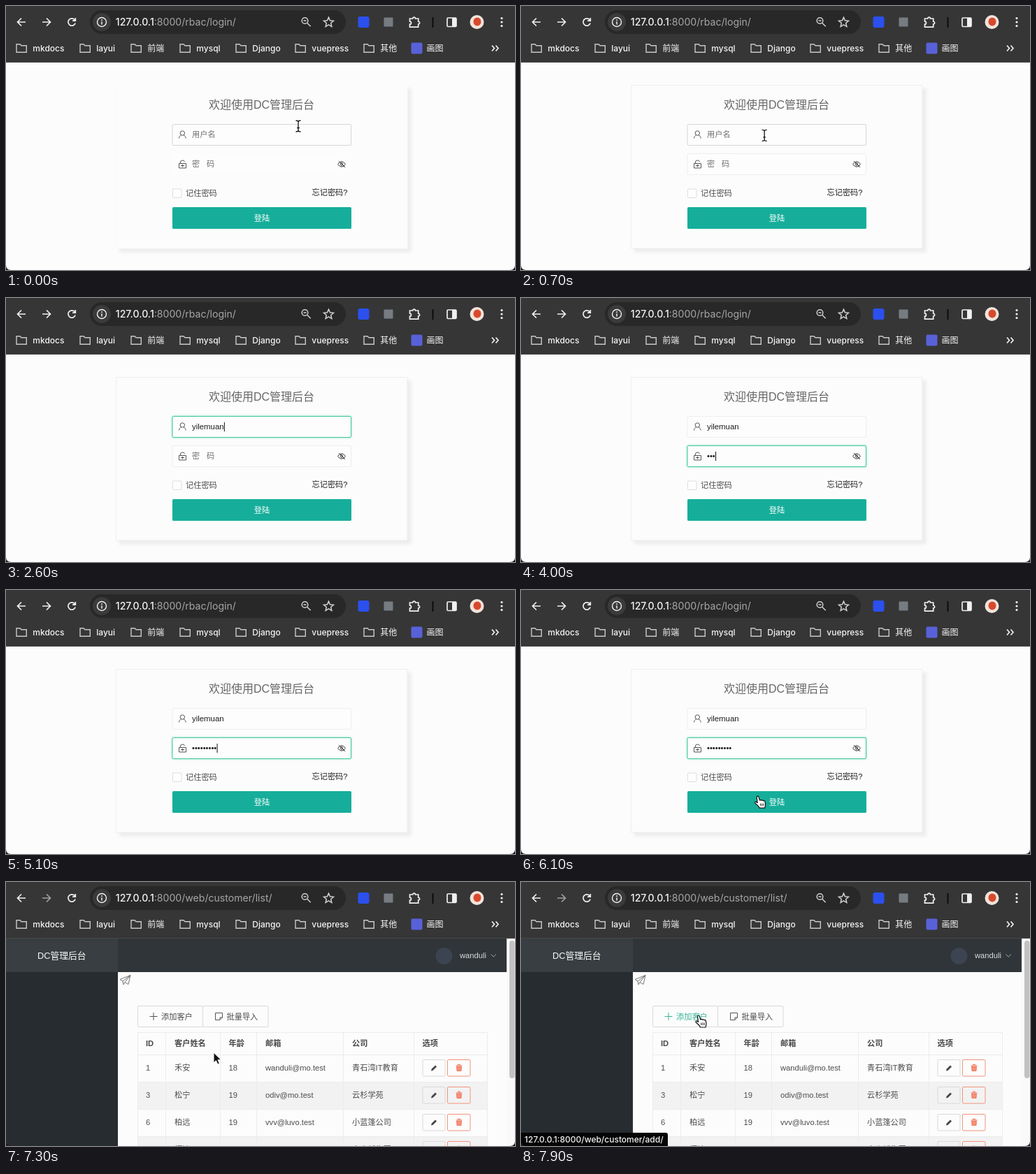
An HTML page for the animation above (8 s loop, 728x378 px).

```html
<!DOCTYPE html>
<html lang="zh-CN">
<head>
<meta charset="utf-8">
<title>DC管理后台</title>
<style>
  html, body { margin: 0; width: 100%; height: 100%; overflow: hidden; background: #fcfcfc; }
  svg { display: block; width: 728px; height: 378px; }
  text { font: 500 11.2px "Liberation Sans", "Noto Sans CJK SC", "Noto Sans CJK", sans-serif; fill: #4c4c4c; white-space: pre; }
  .ui { font-family: Inter, "Noto Sans CJK SC", "Noto Sans CJK", sans-serif; font-size: 12px; fill: #f4f4f4; }
  .url { font-size: 14.1px; }
  .line { fill: none; stroke-width: 1.7; stroke: #f0f0f0; }
  .icon { fill: none; stroke: #555; stroke-width: 1; }
  .card { fill: #fcfcfc; stroke: #eee; filter: drop-shadow(5px 5px 2px #ececec); }
  .box { fill: #fdfdfd; stroke: #eee; }
  .box.hover { stroke: #d6d6d6; }
  .box.focus { stroke: #45c79b; filter: drop-shadow(0 0 1.5px #7fe0bd); }
  .early .card { stroke: #fafafa; }
  .early .box:not(.hover) { stroke: #fcfcfc; }
  .hint { fill: #707070; }
  .typed { font-size: 11.4px; fill: #1c1c1c; }
  .head { font-weight: 700; fill: #484848; }
  .btn { fill: none; stroke: #d9d9d9; }
  .del { stroke: #f2937a; }
  .grid { stroke: #ececec; fill: none; }
  .hot text { fill: #35b597; }
  .hot .icon { stroke: #35b597; }
  .off { display: none; }
</style>
</head>
<body>
<svg id="stage" viewBox="0 0 728 378">
  <rect width="728" height="378" fill="#fcfcfc"/>

  <g id="login">
    <rect class="card" x="157.5" y="113.5" width="416.5" height="233.5"/>
    <text x="290" y="147" style="font-size:16px;font-weight:400;fill:#666">欢迎使用DC管理后台</text>
    <rect class="box" id="userBox" x="238" y="169.5" width="255.5" height="30" rx="1.5"/>
    <rect class="box" id="passBox" x="238" y="211.5" width="255.5" height="30" rx="1.5"/>
    <g class="icon">
      <circle cx="252.3" cy="182" r="3.2"/>
      <path d="M247.5 189.5c.2-2.6 1.5-4 3.2-4.5M254 185c1.7 .6 3 2 3.2 4.5"/>
      <path d="M247.5 225.5h10v6.5h-10zM249.3 225.5v-1.5a3.2 3 0 0 1 6.3-.8M250 228.5h5M252.5 227v3.5"/>
      <path stroke="#333" d="M474.5 226.5q5.5-7.5 11 0q-5.5 7.5-11 0zM476 222l9 9"/>
      <circle cx="480" cy="226.5" r="1.7" stroke="#333"/>
    </g>
    <text class="hint" id="userHint" x="266" y="188.3">用户名</text>
    <text class="hint" id="passHint" x="266" y="230.3">密<tspan x="287">码</tspan></text>
    <text class="typed" id="user" x="266" y="188.2"></text>
    <text class="typed" id="pass" x="266" y="230.2" style="font-size:11.2px"></text>
    <rect id="caret" width="1" height="13" fill="#111"/>
    <rect x="238.5" y="262" width="12.5" height="12.5" rx="1" fill="#fefefe" stroke="#dedede"/>
    <text x="257" y="272">记住密码</text>
    <text x="437.5" y="271.3" style="fill:#222">忘记密码?</text>
    <rect x="238" y="288" width="256" height="31" rx="1.6" fill="#16ae9b"/>
    <text x="354.8" y="307.8" style="fill:#fff">登陆</text>
  </g>

  <g id="admin">
    <rect y="81" width="160" height="297" fill="#262c2f"/>
    <rect x="160" y="81" width="556" height="48" fill="#2f3538"/>
    <rect y="81" width="160" height="48" fill="#383e41"/>
    <text x="45" y="110" style="font-size:12.8px;fill:#fafafa">DC管理后台</text>
    <circle cx="626.5" cy="106" r="12" fill="#3b4450"/>
    <text x="649" y="109" style="fill:#dcdcdc">wanduli</text>
    <path id="chevron" d="M693.5 103.5l3.7 3.7 3.700-3.7" class="icon" style="stroke:#aaa"/>
    <path class="icon" style="stroke:#777" d="M163 139.5l15-6-3 13-5-3-2 3.500-1-5zM167 142l11-8.500-8 10" stroke-linejoin="round"/>
    <g id="add">
      <rect class="btn" x="188.5" y="177.5" width="93" height="30" rx="1.5"/>
      <path class="icon" d="M205.5 192.5h11M211 187v11"/>
      <text x="222" y="196.8">添加客户</text>
    </g>
    <rect class="btn" x="281.5" y="177.5" width="93.5" height="30" rx="1.5"/>
    <path class="icon" d="M299.5 187.5h10v6.500l-3.500 3.500h-6.500zM309.500 194h-3.500v3.500"/>
    <text x="315.5" y="196.8">批量导入</text>
    <g id="table"></g>
    <rect x="716" y="81" width="12" height="297" fill="#f9f9f9"/>
    <rect x="720" y="84" width="7.5" height="197" rx="3.7" fill="#c2c2c2"/>
    <g id="status">
      <path d="M0 359h207q3 0 3 3v16h-210z" fill="#050505"/>
      <text class="ui" x="5" y="372.7">127.0.0.1:8000/web/customer/add/</text>
    </g>
  </g>

  <g id="chrome">
    <rect width="728" height="81" fill="#363636"/>
    <rect y="80" width="728" height="1" fill="#484848"/>
    <rect x="120" y="6" width="366" height="34" rx="17" fill="#282828"/>
    <circle cx="137" cy="23" r="13" fill="#3b3b3b"/>
    <g class="line">
      <path d="M28 23h-11M22 17.5l-5.5 5.5 5.5 5.5"/>
      <path id="forward" d="M52 23h11M58 17.5l5.5 5.5-5.5 5.5"/>
      <path id="reload" d="M98.5 20.2a5.2 5.2 0 1 0 .6 4.3M99.3 17v4.2h-4.2"/>
      <path id="stop" d="M89.5 18.5l9 9M98.5 18.5l-9 9"/>
      <circle cx="137" cy="23" r="6.5" stroke-width="1.4"/>
      <path d="M137 22.3v4.200M137 19.200v1.700" stroke-width="1.5"/>
      <g stroke-width="1.5" stroke="#d0d0d0">
        <circle cx="427.5" cy="21" r="4.3"/>
        <path d="M430.7 24.2l5 5M425.5 21h4"/>
        <path d="M461.5 16.2l2 4.5 5 .5-3.8 3.3 1.1 4.9-4.3-2.6-4.3 2.6 1.1-4.9-3.8-3.3 5-.5z"/>
      </g>
      <path d="M577.5 18h4.2a1.9 1.9 0 0 1 3.8 0h4.2v4.2a1.9 1.9 0 0 1 0 3.8v4.2h-12.2v-4a2 2 0 0 0 0-4z"/>
      <rect x="631" y="17" width="13" height="12.5" rx="1.2"/>
      <path d="M695 56.5l3.5 4-3.5 4M700.5 56.5l3.5 4-3.5 4"/>
    </g>
    <rect x="638" y="17" width="6" height="12.5" fill="#f0f0f0"/>
    <rect x="503.5" y="15" width="16" height="16" rx="3" fill="#2b50ee"/>
    <rect x="540.5" y="16.5" width="13" height="13" rx="1" fill="#777c82"/>
    <rect x="609.5" y="16" width="2" height="15" fill="#0c0c0c"/>
    <circle cx="673.5" cy="23" r="10" fill="#f2e3dc"/>
    <ellipse cx="674" cy="22.5" rx="5.5" ry="6" fill="#d8492c"/>
    <g fill="#f0f0f0">
      <circle cx="709" cy="17.5" r="1.6"/><circle cx="709" cy="23" r="1.6"/><circle cx="709" cy="28.5" r="1.6"/>
    </g>
    <text class="ui url" x="156.8" y="28">127.0.0.1<tspan id="path" fill="#a6a6a6" font-weight="400"></tspan></text>
    <rect x="579.5" y="52.5" width="16" height="16" rx="2" fill="#5961d8"/>
    <text class="ui" x="601.5" y="64.7">画图</text>
  </g>

  <path d="M0 371q0 7 7 7h-7z" fill="#2b1a14"/>
  <path d="M728 371q0 7-7 7h7z" fill="#1d1b20"/>

  <g id="arrow">
    <path d="M0 0v14.5l3.4-3 2.3 5.2 2.6-1.1-2.3-5.1h4.6z" fill="#111" stroke="#fff"/>
  </g>
  <g id="beam" fill="none">
    <path id="beamLine" d="M-3.5-8q3 0 3.5 1.5q.5-1.5 3.5-1.5M0-6.5v13M-3.5 8q3 0 3.5-1.5q.5 1.5 3.5 1.5M-1.8 2.5h3.6"/>
  </g>
  <g id="hand">
    <path d="M-1.5 .5q1.5-2 2.8 0l1.4 5q1.6-1.3 2.7 .2q1.6-1 2.6 .5q1.8-.6 2.3 1l.7 4q0 2-1 5.3h-7.5q-1-2.3-3.2-4.3l-3.3-3q-.5-2 1.7-1.5l1.8 1.3z" fill="#fff" stroke="#111" stroke-width="1.2" stroke-linejoin="round"/>
    <path d="M3.8 10v3.5M6 10v3.5M8.2 10v3.5" stroke="#111" stroke-width=".9"/>
  </g>
</svg>

<script>
const LOOP = 8000, STEP = 100;
const LOADED = 6400;
const USER = "yilemuan";
const USER_KEYS = [1400, 1600, 1800, 1900, 2100, 2200, 2400, 2500];
const PASS_KEYS = [3600, 3800, 4000, 4200, 4400, 4500, 4700, 4900, 5100];
const USER_FOCUS = 1000, PASS_FOCUS = 3200;
// Pointer stops: time, x, y
const STOPS = [[0, 418, 172], [800, 345, 186], [5200, 345, 186], [5900, 338.5, 295.5],
               [6900, 340, 297], [7700, 254, 191.5]];

const $ = id => document.getElementById(id);
const show = (id, on) => $(id).classList.toggle("off", !on);

function buildBookmarks() {
  const marks = [[14, "mkdocs"], [105, "layui"], [178, "前端"], [248, "mysql"],
                 [328, "Django"], [413, "vuepress"], [511, "其他"]];
  $("chrome").insertAdjacentHTML("beforeend", marks.map(([x, name]) =>
    `<path class="line" style="stroke-width:1.4;stroke:#c8c8c8" d="M${x + 1} 54.7h5l2 2h7.3v9.6h-14.3z"/>
     <text class="ui" x="${x + 24.3}" y="64.7">${name}</text>`).join(""));
}

function buildTable() {
  const cols = [200, 241, 318.5, 371, 495, 595.5];
  const rows = [
    ["1", "禾安", "18", "wanduli@mo.test", "青石湾IT教育"],
    ["3", "松宁", "19", "odiv@mo.test", "云杉学苑"],
    ["6", "柏远", "19", "vvv@luvo.test", "小蓝篷公司"],
    ["7", "梧清", "20", "vvv@luvo.test", "大青桥集团"]
  ];
  const cells = (words, y, kind) =>
    words.map((w, i) => `<text class="${kind}" x="${cols[i]}" y="${y}">${w}</text>`).join("");
  let out = cells(["ID", "客户姓名", "年龄", "邮箱", "公司", "选项"], 235, "head");
  let lines = "M188.5 215.5h500";
  rows.forEach((row, i) => {
    const top = 247 + 39 * i;
    if (i % 2) out += `<rect x="188" y="${top}" width="500" height="39" fill="#f2f2f2"/>`;
    lines += `M188.5 ${top + .5}h500`;
    out += cells(row, top + 23.3, "") + `
      <g transform="translate(0 ${top})">
        <rect class="btn" x="596" y="7.5" width="32" height="23.5" rx="1.5"/>
        <path d="M608 23.5l.7-2.7 5.3-5.3 2 2-5.3 5.3z" fill="#444"/>
        <rect class="btn del" x="631.5" y="7.5" width="32.5" height="23.5" rx="1.5"/>
        <path d="M643.5 16h9M646.500 15.500v-1.300h3v1.300" class="icon" style="stroke:#f0694a"/>
        <path d="M644.5 17.5h7l-.5 6h-6z" fill="#f3927b" stroke="#f0694a" stroke-width=".8"/>
      </g>`;
  });
  for (const x of [188.5, 228.5, 306.5, 358.5, 482.5, 583.5, 688.5]) lines += `M${x} 215.5V378`;
  $("table").innerHTML = out + `<path class="grid" d="${lines}"/>`;
}

function buildBeam() {
  const d = $("beamLine").getAttribute("d");
  $("beam").innerHTML = `<path d="${d}" stroke="#fff" stroke-width="3"/><path d="${d}" stroke="#111" stroke-width="1.3"/>`;
}

function pointerAt(t) {
  const i = STOPS.findIndex(s => s[0] > t);
  if (i < 0) return STOPS[STOPS.length - 1].slice(1);
  const [t0, x0, y0] = STOPS[i - 1], [t1, x1, y1] = STOPS[i];
  const k = (t - t0) / (t1 - t0), e = k * k * (3 - 2 * k);
  return [x0 + (x1 - x0) * e, y0 + (y1 - y0) * e];
}

function drawPointer(t, x, y, onAdd) {
  const hidden = t >= USER_KEYS[0] && t < 5300;
  const onUser = y > 169 && y < 200, onPass = y > 211 && y < 242;
  let kind = "arrow";
  if (t < LOADED) kind = onUser || onPass ? "beam" : y > 288 ? "hand" : "arrow";
  else if (onAdd) kind = "hand";
  for (const id of ["arrow", "beam", "hand"]) show(id, !hidden && id === kind);
  $(kind).setAttribute("transform", `translate(${x} ${y})`);
  $("userBox").classList.toggle("hover", !hidden && onUser);
}

function drawForm(t) {
  const count = keys => keys.filter(k => k <= t).length;
  const typed = count(USER_KEYS), dots = count(PASS_KEYS);
  const inPass = t >= PASS_FOCUS;
  $("user").textContent = USER.slice(0, typed);
  $("pass").textContent = "•".repeat(dots);
  show("userHint", !typed);
  show("passHint", !dots);
  $("userBox").classList.toggle("focus", t >= USER_FOCUS && !inPass);
  $("passBox").classList.toggle("focus", inPass);

  const last = Math.max(...[USER_FOCUS, PASS_FOCUS, ...USER_KEYS, ...PASS_KEYS].filter(k => k <= t));
  show("caret", t >= USER_FOCUS && Math.floor((t - last) / 530) % 2 === 0);
  const field = $(inPass ? "pass" : "user");
  const width = field.textContent ? field.getComputedTextLength() : 0;
  $("caret").setAttribute("x", 266.3 + width);
  $("caret").setAttribute("y", inPass ? 220 : 178);
}

function draw(t) {
  const inside = t >= LOADED, loading = inside && t < 6900;
  const [x, y] = pointerAt(t);
  const onAdd = inside && x < 281 && y < 208;
  show("login", !inside);
  show("admin", inside);
  show("reload", !loading);
  show("stop", loading);
  show("chevron", t >= 6800);
  show("status", onAdd);
  $("add").classList.toggle("hot", onAdd);
  $("login").classList.toggle("early", t < STEP);
  $("path").textContent = inside ? ":8000/web/customer/list/" : ":8000/rbac/login/";
  $("forward").style.stroke = inside ? "#a0a0a0" : "";
  if (!inside) drawForm(t);
  drawPointer(t, x, y, onAdd);
}

buildBookmarks();
buildTable();
buildBeam();
const start = performance.now();
function tick() {
  const t = (performance.now() - start) % LOOP;
  draw(Math.floor(t / STEP) * STEP);
  requestAnimationFrame(tick);
}
tick();
</script>
</body>
</html>
```
